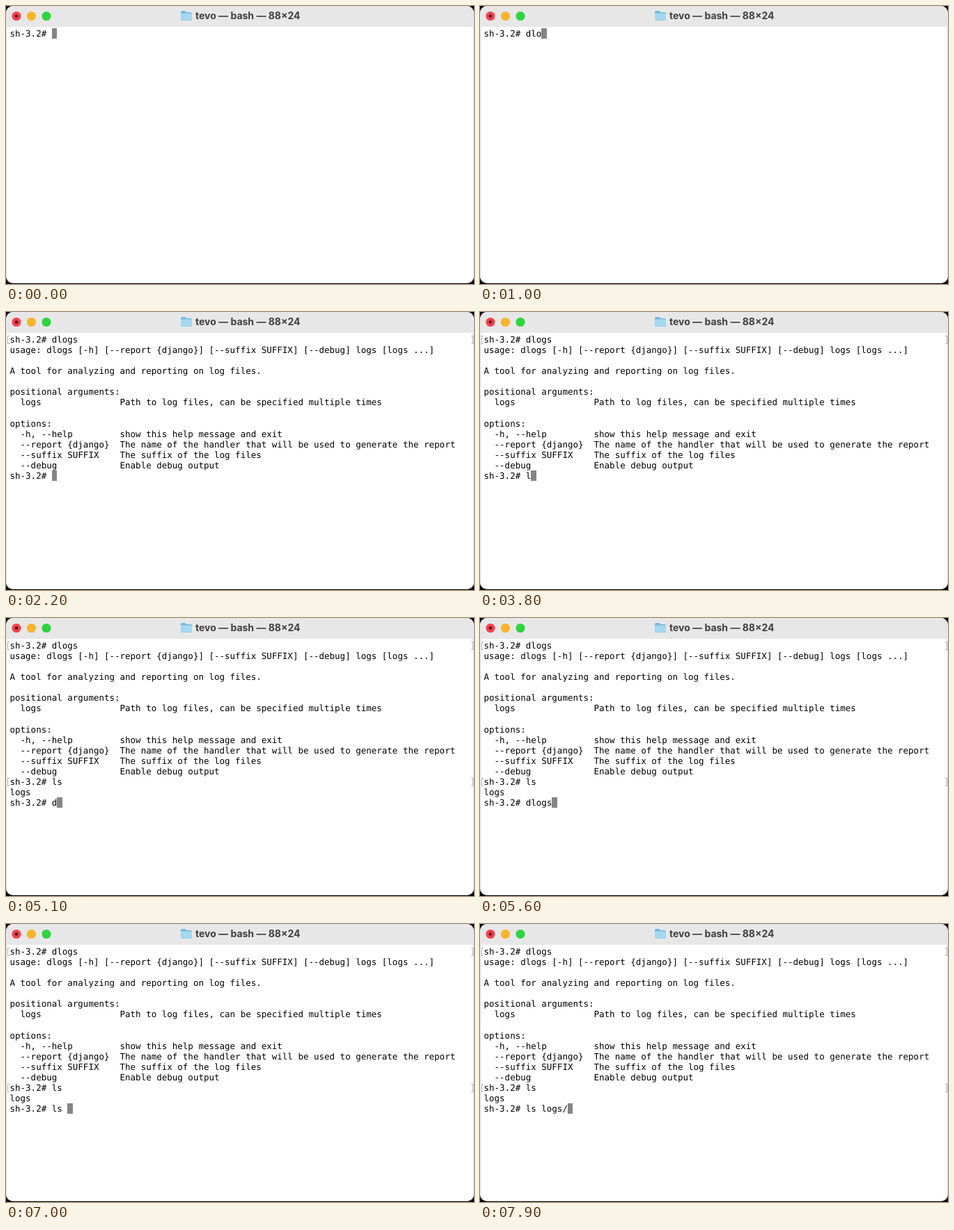
Recreate the animation shown at these times as an HTML page. Size 672x400 px, loop 8000 ms.

```html
<!DOCTYPE html>
<html lang="en">
<head>
<meta charset="utf-8">
<title>Terminal session</title>
<style>
  html, body { margin: 0; width: 100%; height: 100%; overflow: hidden; background: #000; }
  #window {
    position: absolute; left: 0; top: 0; width: 672px; height: 399px;
    overflow: hidden; border-radius: 10px; background: #fff;
  }
  #window::after {
    content: ""; position: absolute; inset: 30px 0 0;
    border: solid #d9d9d9; border-width: 0 1px 1px; border-radius: 0 0 10px 10px;
  }
  #bar { position: absolute; width: 100%; height: 30px; background: #e8e7e8; }
  #bar svg { position: absolute; left: 0; top: 0; }
  #title {
    position: absolute; left: 272px; top: 4px; white-space: pre;
    font: 700 14px/20px Inter, sans-serif; color: #403f40;
  }
  #text {
    position: absolute; left: 5.5px; top: 32px; margin: 0;
    font: 12.5px/15.08px "DejaVu Sans Mono", monospace;
    text-rendering: geometricPrecision; font-variant-ligatures: none; color: #000;
  }
  #cursor { position: absolute; width: 7.5px; height: 15px; background: #858585; }
  .mark {
    position: absolute; width: 2px; height: 10px;
    border: 1px solid #b0b0b0; box-sizing: content-box;
  }
  .mark.left { left: 2px; border-right: 0; }
  .mark.right { left: 668px; border-left: 0; }
</style>
</head>
<body>
<div id="window">
  <div id="bar">
    <svg width="672" height="30">
      <circle cx="15" cy="14.5" r="6.6" fill="#f2434f"/>
      <circle cx="15" cy="14.5" r="2.3" fill="#5c0b12"/>
      <circle cx="36.5" cy="14.5" r="6.6" fill="#f6b52e"/>
      <circle cx="58" cy="14.5" r="6.6" fill="#30d43f"/>
      <path d="M251 9q0-2 2-2h4l2 2h6q2 0 2 2v8q0 2-2 2h-12q-2 0-2-2z" fill="#74b9dc"/>
      <rect x="251" y="10.5" width="16" height="10.2" rx="1.5" fill="#a5d8f0"/>
    </svg>
    <div id="title">tevo — bash — 88×24</div>
  </div>
  <div id="cursor"></div>
  <pre id="text"></pre>
  <div id="marks"></div>
</div>
<script>
const LOOP = 8000;
const CELL = 7.525, ROW = 15.08, LEFT = 5.5, TOP = 32;
const PROMPT = "sh-3.2# ";
const USAGE = `usage: dlogs [-h] [--report {django}] [--suffix SUFFIX] [--debug] logs [logs ...]

A tool for analyzing and reporting on log files.

positional arguments:
  logs               Path to log files, can be specified multiple times

options:
  -h, --help         show this help message and exit
  --report {django}  The name of the handler that will be used to generate the report
  --suffix SUFFIX    The suffix of the log files
  --debug            Enable debug output
`;

// Screen phases: start time, text above the input, rows with bracket marks.
const first = PROMPT + "dlogs\n";
const second = first + USAGE + PROMPT;
const phases = [
  [0, PROMPT, []],
  [2000, first, [0]],
  [2100, second, [0]],
  [4100, second + "ls\nlogs\n" + PROMPT, [0, 13]],
];

// Input line after each key press.
const inputs = [[0, ""]];
function keys(start, ...values) {
  values.forEach((value, i) => inputs.push([start + i * 100, value]));
}
keys(800, "d", "dl", "dlo", "dlog", "dlogs");
keys(2000, "");
keys(3800, "l", "ls");
keys(4100, "");
keys(5100, "d", "dl");
keys(5400, "dlo", "dlog", "dlogs");
keys(5900, "dlog");
keys(6100, "dlo", "dl", "d", "");
keys(6800, "l", "ls", "ls ");
keys(7300, "ls l", "ls lo", "ls log", "ls logs");
keys(7900, "ls logs/");

const byId = id => document.getElementById(id);
const text = byId("text"), cursor = byId("cursor"), marks = byId("marks");
const current = (steps, t) => steps.findLast(([start]) => start <= t);
let shown = null;

function draw(t) {
  const [, base, rows] = current(phases, t);
  const content = base + current(inputs, t)[1];
  if (content === shown) return;
  shown = content;
  text.textContent = content;
  const lines = content.split("\n");
  cursor.style.left = LEFT + lines.at(-1).length * CELL + "px";
  cursor.style.top = TOP + (lines.length - 1) * ROW + "px";
  marks.innerHTML = rows.flatMap(row => ["left", "right"].map(side =>
    `<div class="mark ${side}" style="top:${TOP + 2 + row * ROW}px"></div>`)).join("");
}

function tick() {
  draw(performance.now() % LOOP);
  requestAnimationFrame(tick);
}
tick();
</script>
</body>
</html>
```
